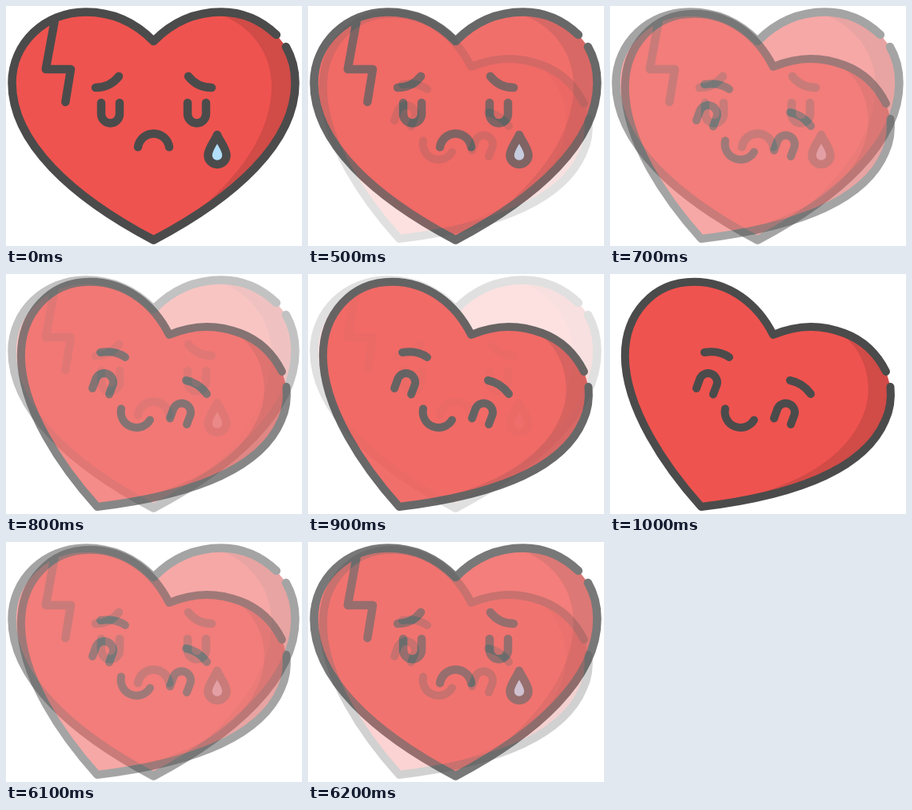
An HTML page that plays this animation: 370x300 px, repeating every 6.3 s.

```html
<!DOCTYPE html>
<html lang="en">
<head>
<meta charset="utf-8">
<title>Sad heart, happy heart</title>
<style>
  html, body { margin: 0; height: 100%; overflow: hidden; background: #fff; }
  svg { display: block; width: 100%; height: 100%; }
  .skin { fill: #ef534f; }
  .shade { fill: #d14b47; }
  .line { fill: none; stroke: #4b4b4b; stroke-width: 10.5; stroke-linecap: round; stroke-linejoin: round; }
  #happy .line { stroke-width: 10; }
</style>
</head>
<body>
<svg viewBox="0 0 370 300">
  <defs>
    <path id="sadShape" d="M350 51C358 65 361.5 80 361.5 96C361.5 171 286 239 184.5 292.5C83 239 7.5 171 7.5 96C7.5 47 48 7.5 100 7.5C134 7.5 162 21 184.5 44C207 21 235 7.5 269 7.5C296 7.5 319 18 338 36"/>
    <path id="happyShape" d="M350.5 141C352 156 350 170 344 183C317 247 223 278 114 291C70 242 18.8 168 18.8 102C18.8 50 54 9.7 105 9.7C150 9.7 185 38 204 76C232 64 262 62 293 74C317 83 334 100 345 122"/>
    <clipPath id="sadClip"><use href="#sadShape"/></clipPath>
    <clipPath id="happyClip"><use href="#happyShape"/></clipPath>
  </defs>

  <g id="sad">
    <use href="#sadShape" class="skin"/>
    <path class="shade" clip-path="url(#sadClip)" d="M258 8C300 18 332 54 332 100C332 160 290 215 232 263L370 300V0Z"/>
    <g class="line">
      <use href="#sadShape"/>
      <path d="M60.5 20L49.7 79H81L74.3 120"/>
      <g id="sadSide">
        <path d="M112 102Q130 102 141 88"/>
        <path d="M119 121V135A11.5 11.5 0 0 0 142 135V121"/>
      </g>
      <use href="#sadSide" transform="matrix(-1 0 0 1 369 0)"/>
      <path d="M165 176.3A19.7 19.7 0 0 1 204 176.3"/>
      <path fill="#b2dffb" d="M264 161C261.5 168 252.5 178 252.5 186.5A11.5 11.5 0 0 0 275.5 186.5C275.5 178 266.5 168 264 161Z"/>
    </g>
  </g>

  <g id="happy">
    <use href="#happyShape" class="skin"/>
    <path class="shade" clip-path="url(#happyClip)" d="M280 70C320 90 331 140 317 175C295 230 240 258 178 277L370 300V60Z"/>
    <g class="line">
      <use href="#happyShape"/>
      <path d="M118 98Q136 95 149 104"/>
      <path d="M225 133Q241 136 251 150"/>
      <path id="happyEye" d="M108 143L112.6 130.3A11.3 11.3 0 0 1 133.6 138.3L129 150.5"/>
      <use href="#happyEye" x="97" y="37.5"/>
      <path d="M144 168.5A19.6 19.6 0 0 0 180 182.5"/>
    </g>
  </g>
</svg>
<script>
  const LOOP = 6300, STEP = 100;
  const sad = document.getElementById('sad');
  const happy = document.getElementById('happy');
  const start = performance.now();

  // Share of the happy heart: both fades move in hard steps.
  function happiness(t) {
    if (t < 500) return 0;
    if (t < 1000) return (Math.floor((t - 500) / STEP) + 1) / 6;
    if (t < 6000) return 1;
    return (3 - Math.floor((t - 6000) / STEP)) / 4;
  }

  function draw(now) {
    const share = happiness(Math.max(0, now - start) % LOOP);
    happy.setAttribute('opacity', share);
    sad.setAttribute('opacity', 1 - share);
    requestAnimationFrame(draw);
  }
  draw(start);
</script>
</body>
</html>
```
